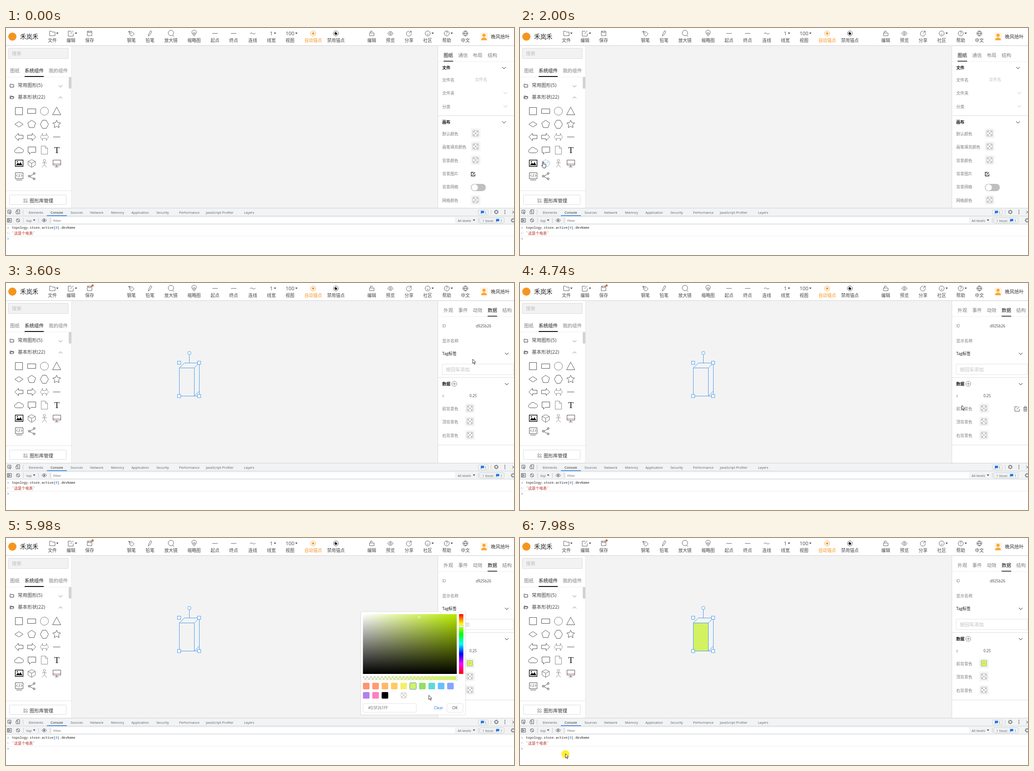
These frames come from a looping animation (1118x501 px, 8000 ms). An HTML page:

```html
<!DOCTYPE html>
<html lang="zh-CN">
<head>
<meta charset="utf-8">
<style>
html,body{margin:0;width:100%;height:100%;overflow:hidden;background:#fff}
svg{display:block;width:100vw;height:100vh;font-family:"Open Sans","Noto Sans CJK SC","Noto Sans CJK",sans-serif}
text{white-space:pre}
.mono{font-family:"Noto Sans Mono","Noto Sans CJK SC",monospace}
</style>
</head>
<body>
<svg id="stage" viewBox="0 0 1118 501"></svg>
<script>
const DARK = '#444', GREY = '#7d7d7d', PALE = '#bfbfbf', LINE = '#e4e4e4', BLUE = '#1a73e8', NODE = '#4a9cf0', ORANGE = '#f5951f', LIME = '#d3f261';

// Drawing helpers, each returning SVG markup
const T = (x, y, s, size = 9, fill = DARK, attr = '') => `<text x="${x}" y="${y}" font-size="${size}" fill="${fill}" ${attr}>${s}</text>`;
const mid = (x, y, s, size, fill, attr = '') => T(x, y, s, size, fill, 'text-anchor="middle" ' + attr);
const P = (x, y, d, stroke = DARK, w = 1, fill = 'none') => `<path transform="translate(${x} ${y})" d="${d}" stroke="${stroke}" stroke-width="${w}" fill="${fill}"/>`;
const R = (x, y, w, h, fill = 'none', stroke = 'none', rx = 0) => `<rect x="${x}" y="${y}" width="${w}" height="${h}" fill="${fill}" stroke="${stroke}" rx="${rx}"/>`;
const C = (x, y, r, fill = 'none', stroke = DARK) => `<circle cx="${x}" cy="${y}" r="${r}" fill="${fill}" stroke="${stroke}"/>`;
const G = (id, body) => `<g id="${id}">${body}</g>`;
const poly = (n, r, r2 = r) => 'M' + Array.from({length: n}, (_, i) => {
  const a = i / n * 2 * Math.PI - Math.PI / 2, q = i % 2 ? r2 : r;
  return (q * Math.cos(a)).toFixed(1) + ' ' + (q * Math.sin(a)).toFixed(1);
}).join('L') + 'z';
const chevron = (x, y, color = '#222', up = 1) => P(x, y, `M-4 ${-2 * up}l4 ${4 * up} 4 ${-4 * up}`, color);
const caret = (x, y) => P(x, y, 'M-2.5-1.3h5l-2.5 3z', 'none', 0, '#333');
const EDIT = 'M1-5h-6v10h10v-5M-1 1l6-6';

function header() {
  const circle = 'M-5.5 0a5.5 5.5 0 1 0 11 0a5.5 5.5 0 1 0-11 0', dash = 'M-6 0h12';
  const dot = 'M-2 0a2 2 0 1 0 4 0a2 2 0 1 0-4 0';
  const tools = [
    [102, '文件', 'M-6-5h4l2 2h6v8h-12z', 1], [143, '编辑', 'M1-5h-7v11h11v-6M-1 1l6-7', 1],
    [184, '保存', 'M-5-5h9l1 1v9h-10zM-3-5v3h6v-3'], [276, '钢笔', 'M-6-5l8 2 4 4-5 5-4-3zM-6-5l6 6'],
    [317, '铅笔', 'M-4 6l1-4 4-8 3 2-4 7z'], [363, '放大镜', 'M-6-1a6 6 0 1 0 12 0a6 6 0 1 0-12 0M4 4l3 3'],
    [414, '缩略图', 'M0 6c-8-9-5-13 0-13s8 4 0 13z' + dot], [460, '起点', dash], [501, '终点', dash],
    [543, '连线', 'M-6 1c4-7 7 5 12-2'], [584, '线宽', '', 1], [625, '视图', '', 1],
    [676, '自动锚点', circle], [726, '禁用锚点', circle],
    [805, '编辑', 'M-5-1h10v6h-10zM-3-1v-4h4v2'], [846, '预览', 'M-6 0q6-9 12 0q-6 9-12 0z' + dot],
    [887, '分享', 'M5 0a5.5 5.5 0 1 1-5-5M0 0l5-5h-4m4 0v4'], [928, '社区', circle + 'M-2 1q2 3 4 0', 1],
    [970, '帮助', circle, 1], [1011, '中文', circle + 'M-5.5 0h11M0-5.5q-5 5.5 0 11q5-5.5 0-11']
  ];
  return R(0, 38, 1118, 1, '#dedede') + R(0, 39, 1118, 1, '#ebebeb') + R(0, 0, 1118, 38, '#fff') + C(14, 19, 9, ORANGE, 'none') + T(31, 24, '禾岚禾', 13.4, '#222') +
    tools.map(([x, name, d, menu]) => {
      const color = name == '自动锚点' ? ORANGE : DARK;
      return P(x, 12, d, color, .85) + mid(x, 31, name, 9.7, color) + (menu ? caret(x + (name == '视图' ? 14 : name == '线宽' ? 8 : 11), 11.5) : '');
    }).join('') +
    mid(584, 16, 1, 11) + mid(625, 16, 100, 11) + mid(970, 15, '?', 8.5) + C(676, 12, 2.5, ORANGE, 'none') + P(726, 12, 'M0-3a3 3 0 1 0 3 3z', 'none', 0, '#111') +
    R(1044, 10, 17, 18, '#fff4e2') + C(1052, 16, 3.6, '#f9a83a', 'none') + P(1052, 27, 'M-6 0v-3q6-6 12 0v3z', 'none', 0, '#f9a83a') +
    T(1067, 23, '晚风拾叶', 10.4, '#333');
}

const CUBE = 'M0-8l8 4v8l-8 5-8-5v-8zM-8-4l8 4 8-4M0 0v9';
function library() {
  const shapes = [
    'M-8-8h16v16h-16z', 'M-9-5h18v10h-18z', 'M-9 0a9 9 0 1 0 18 0a9 9 0 1 0-18 0', 'M0-9l9 17h-18z',
    'M-9 0l9-6 9 6-9 6z', poly(5, 9), 'M-4-9h8l5 9-5 9h-8l-5-9z', poly(10, 9, 4.5),
    'M-9 0l8-8v4h10v8h-10v4z', 'M9 0l-8-8v4h-10v8h10v4z', 'M-9 0l5-8v5h8v-5l5 8-5 8v-5h-8v5z', 'M-8 0h16',
    'M-5 6a4 4 0 0 1-1-8a6 6 0 0 1 11-1a4.5 4.5 0 0 1 1 9z', 'M-8-7h17v12h-10l-4 4v-4h-3z', 'M-7-9h9l5 5v13h-14zM2-9v5h5', '',
    'M-8-7h17v14h-17z', CUBE, 'M0-3v6l-5 6M0 3l5 6M-5-1h10M-2.5-6a2.5 2.5 0 1 0 5 0a2.5 2.5 0 1 0-5 0', 'M-8-7h17v11h-17zM-8 1h17M0 4v4M-4 8h8',
    'M-8-8h17v13h-17zM-3-4l-3 2 3 3M4-4l3 2-3 3M1-5l-1 7M-6 8h13', 'M-5 0l11-6M-5 0l11 6'
  ];
  const soft = {2: '#666', 10: GREY, 14: GREY, 17: '#555', 18: GREY};
  const at = i => [Math.round(28 + i % 4 * 27.8) + .5, Math.round(183 + Math.floor(i / 4) * 28.7) + .5];
  return R(0, 40, 144, 357, '#fff') + R(143.5, 40, 1, 357, '#e8e8e8') +
    R(5, 44.5, 132, 23, '#f2f2f2', '#dcdcdc', 1) + T(13, 60, '搜索', 10.5, PALE) +
    T(9, 97.5, '图纸', 10.5, GREY) + T(41, 97.5, '系统组件', 10.5, '#111', 'font-weight="500"') + T(94, 97.5, '我的组件', 10.5, GREY) +
    R(0, 107.5, 144, 1, '#eee') + R(41, 106, 42, 2, '#111') + R(138, 108, 6, 26, '#d3d3d3', 'none', 3) +
    P(13, 127, 'M-4-3h3l1 1h4v5.5h-8z', '#333') + T(26, 129.5, '常用图形(5)', 10.5) + chevron(120, 128.5, GREY) +
    P(13, 153, 'M-4 3v-6h3l1 1h3v2M-4 3l1.5-4h7l-1.5 4z', '#333') + T(26, 155.5, '基本形状(22)', 10.5) + chevron(120, 153.5, GREY, -1) +
    shapes.map((d, i) => P(...at(i), d, soft[i] || '#333', .85)).join('') +
    mid(112, 276, 'T', 19, '#111', 'font-family="Liberation Serif,serif"') +
    P(28, 298, 'M-6 5l4-6 3 3 3-4 4 7z', 'none', 0, '#111') + P(...at(16), shapes[16], '#111', 1.4) + C(25, 295, 1.3, '#111', 'none') +
    [[51, 327], [62, 321], [62, 333]].map(p => C(...p, 2, '#fff', '#333')).join('') + R(104, 299, 16, 1, '#c77') +
    G('cubeHover', P(...at(17), CUBE, '#fff', 2) + P(...at(17), CUBE, '#9db6f2', .9)) +
    R(0, 358.5, 144, 1, LINE) + R(7.5, 368.5, 125, 21, '#fff', '#dcdcdc', 1) +
    P(43, 381, 'M-4-4h3v3h-3zM-4 1h3v3h-3zM1 1h3v3h-3zM2.5-4.5l2 2-2 2-2-2z', GREY, .8) + T(52, 384.8, '图形库管理', 10.4, '#333');
}

function swatch(x, y, color) {
  const cells = [[-5, -5], [2, -5], [-1.5, -1.5], [-5, 2], [2, 2]];
  return R(x - 9.5, y - 9.5, 19, 19, '#fff', '#e6e6e6', 1) + R(x - 6.5, y - 6.5, 13, 13, color || '#fff', '#aaa', 1) +
    (color ? P(x, y, 'M-2-1l2 2 2-2', '#9aa860', .8) : cells.map(([a, b]) => R(x + a, y + b, 3, 3, '#b5b5b5')).join(''));
}
const tabs = (names, active) => names.map((s, i) => T(963 + i * 32.3, 63.8, s, 10.5, i == active ? '#111' : GREY, i == active ? 'font-weight="500"' : '')).join('') +
  R(951, 73.5, 167, 1, '#eee') + R(963 + active * 32.3, 72.5, 21, 1.5, '#111');
const title = (y, s) => T(960, y, s, 9, '#111', 'font-weight="700"');

function sheetPanel() {
  const rows = ['默认颜色', '画笔填充颜色', '背景颜色', '背景图片', '背景网格', '网格颜色'];
  return tabs(['图纸', '通信', '布局', '结构'], 0) + title(91, '文件') + chevron(1096, 88) +
    T(960, 117.5, '文件名', 9, GREY) + T(1032, 117, '文件名', 9, PALE) +
    T(960, 147, '文件夹', 9, GREY) + chevron(1099, 143.5, PALE) + T(960, 176.5, '分类', 9, GREY) + chevron(1099, 173, PALE) +
    R(951, 193, 167, 1, '#dcdcdc') + title(211, '画布') + chevron(1096, 208) +
    rows.map((s, i) => T(960, 236.7 + i * 29.4, s, 8.9, GREY) + (i < 3 || i > 4 ? swatch(1033.5, Math.round(232 + i * 29.4) + .5) : '')).join('') +
    P(1028, 322.5, 'M1-4h-5v8h8v-4M-1 1l5-5', '#222', 1.3) + R(1023, 344, 33, 16, PALE, 'none', 8) + C(1031.5, 352, 7, '#fff', 'none');
}

function dataPanel() {
  return tabs(['外观', '事件', '动效', '数据', '结构'], 3) +
    T(960, 98, 'ID', 8.5, GREY) + T(1034, 97.5, 'd925b26', 8.3) + T(960, 130.5, '显示名称', 9, GREY) +
    T(960, 159, 'Tag标签', 8.8, '#111', 'font-weight="500"') + chevron(1102, 156) +
    R(960, 179, 157.5, 23, '#fff', '#e2e2e2', 1) + T(968, 194.5, '按回车添加', 10.5, PALE) +
    R(951, 208, 167, 1, '#dedede') + title(226, '数据') + C(986.5, 222.5, 5.5, 'none', GREY) + P(986.5, 222.5, 'M-3 0h6M0-3v6', GREY) + chevron(1102, 223) +
    T(960, 252, 'z', 8.5, GREY) + T(1020, 252, '0.25', 8.2) +
    ['前背景色', '顶背景色', '右背景色'].map((s, i) => T(960, 281 + i * 29.4, s, 8.9, GREY) + swatch(1021, Math.round(276 + i * 29.4) + .5)).join('') +
    G('picked', swatch(1021, 276.5, LIME)) + R(951, 357, 167, 1, '#dedede') +
    G('rowTools', P(1094, 278, EDIT, '#555') + P(1112, 278, 'M-4-3h8M-2-3v-2h4v2M-3-3v8h6v-8M-1-1v4M1-1v4', '#555'));
}

function node() {
  return G('front', R(381, 187, 33, 62, LIME)) +
    P(.5, .5, 'M381 187h33v62h-33zl11-11h33v62l-11 11M414 187l11-11M425 238v11h-11M403 157v19', NODE) +
    C(403.5, 154.5, 3.6, '#fff', NODE) +
    [[381, 176], [425, 176], [381, 249.5], [425, 249.5]].map(([x, y]) => R(x - 3.5, y - 3.5, 7, 7, '#fff', NODE)).join('');
}

// Colour picker for one HSV colour; the text is empty until a colour is chosen
function picker(id, hue, sat, val, color, text) {
  const rows = ['#ff9471', '#ff9c6e', '#ffb86b', '#ffcb62', '#f5f066', LIME, '#95de64', '#5cdbd3', '#69c0ff', '#85a5ff', '#b37feb', '#ff7fbf', '#000'];
  const grad = (name, attr, stops) => `<linearGradient id="${name + id}" ${attr}>${stops.map(([o, c, a = 1]) => `<stop offset="${o}" stop-color="${c}" stop-opacity="${a}"/>`).join('')}</linearGradient>`;
  const down = 'x2="0" y2="1"', hues = Array.from({length: 7}, (_, i) => [i / 6, `hsl(${i * 60},100%,50%)`]);
  return G(id, grad('sat', '', [[0, '#fff'], [1, `hsl(${hue},100%,46%)`]]) + grad('dark', down, [[0, '#000', 0], [1, '#000']]) +
    grad('hue', down, hues) + grad('alpha', '', [[0, color, 0], [1, color]]) +
    R(785.5, 168, 206.5, 132, `url(#sat${id})`) + R(785.5, 168, 206.5, 132, `url(#dark${id})`) +
    C(785.5 + 206.5 * sat, 168 + 132 * (1 - val), 2, 'none', '#fff') +
    R(997, 168, 9.5, 132, `url(#hue${id})`) + R(996, 167 + 132 * hue / 360, 11.5, 3, '#fff', '#ccc', 1) +
    R(785.5, 305, 206.5, 8.5, 'url(#checker)') + R(785.5, 305, 206.5, 8.5, `url(#alpha${id})`) + R(990, 304, 3, 10.5, '#fff', '#ccc', 1) +
    rows.map((c, i) => R(785.5 + i % 10 * 20.6, i < 10 ? 319.5 : 340, 14.5, 14.5, c, text && c == LIME ? '#4a90e2' : 'none', 2)).join('') +
    R(868, 340, 14.5, 14.5, 'url(#checker)', 'none', 2) +
    R(785.5, 365.5, 117.5, 19, '#fff', LINE, 2) + T(797, 378, text, 8.3, '#666') + mid(952, 378, 'Clear', 8.3, BLUE) +
    R(970.5, 365.5, 35.5, 19, '#fff', LINE, 2) + mid(988, 378, 'OK', 8.5, DARK));
}

function devtools() {
  const names = {50: 'Elements', 98: 'Console', 142: 'Sources', 185: 'Network', 231: 'Memory', 276: 'Application', 331: 'Security', 381: 'Performance', 440: 'JavaScript Profiler', 524: 'Layers'};
  const ui = (x, y, s, color = '#5f6368') => T(x, y, s, 7.4, color);
  const bar = (x, y) => R(x, y, 1, 11, '#ccc');
  const gear = (x, y) => C(x, y, 3, 'none', '#555') + P(x, y, 'M0-5v2M0 3v2M-5 0h2M3 0h2M-3.5-3.5l1 1M3.5 3.5l-1-1M-3.5 3.5l1-1M3.5-3.5l-1 1', '#555', 1.3);
  const chat = (x, y) => P(x, y, 'M-3-3h7v5h-5l-2 2z', 'none', 0, BLUE);
  return R(0, 397, 1118, 104, '#fff') + R(0, 397, 1118, 36, '#f1f3f4') + R(0, 397, 1118, 1, '#cfd2d5') + R(0, 414.5, 1118, 1, '#d0d3d6') + R(0, 432.5, 1118, 1, '#d0d3d6') +
    Object.entries(names).map(([x, s]) => ui(x, 409.5, s, s == 'Console' ? '#222' : undefined)).join('') + R(90, 413.5, 44, 1.5, BLUE) +
    P(8, 406, 'M3-1v-3h-7v7h3M-1-1l5 2-2 1-1 3z', '#555') + P(26, 406, 'M-4 3v-5h4v6h-4M-2-2v-3h6v9h-3', '#555') + bar(37, 401) +
    R(1039.5, 401.5, 22, 10.5, '#f1f3f4', '#cfd2d6', 2) + chat(1048, 406.5) + ui(1053, 409.5, 1) + bar(1067, 401) + gear(1079, 406) +
    [-3.5, 0, 3.5].map(d => C(1098, 406 + d, 1, '#555', 'none')).join('') + P(1117, 406.5, 'M-3-3l6 6M-3 3l6-6', '#555') +
    P(7, 424.5, 'M-4-4h9v8h-9zM-2-4v8M0-2l3 2-3 2z', '#555') + C(26.5, 424.5, 3.7, 'none', '#555') + P(26.5, 424.5, 'M-2.5-2.5l5 5', '#555') + bar(38, 419) +
    ui(45, 427.5, 'top') + caret(62, 424) + bar(71, 419) + P(84, 424.5, 'M-5 0q5-7 10 0q-5 7-10 0z', '#555') + C(84, 424.5, 1.7, '#555', 'none') + bar(97, 419) +
    R(101, 418, 887, 13, '#fff') + ui(104, 427.8, 'Filter', '#666') + ui(994, 427.5, 'All levels') + caret(1030, 424) + bar(1039, 419) +
    R(1042.5, 418.5, 54, 12, '#f1f3f4', '#cfd2d6', 2) + ui(1048, 427.5, '1 Issue:') + chat(1081.5, 424.5) + ui(1088, 427.5, 1) + gear(1116, 424.5) +
    P(5, 441, 'M-1.5-2l2 2-2 2', GREY) + P(5, 452.5, 'M0-2l-2 2 2 2M2 0h1', '#999', .8) + P(5, 465, 'M-1.5-2l2 2-2 2', BLUE) +
    T(13, 443, 'topology.store.active[<tspan fill="#2f7fd6">0</tspan>].devName', 7.28, '#222', 'class="mono"') +
    T(13, 455.5, "'这是个电表'", 8.2, '#b3261e', 'class="mono"') + R(0, 459, 1118, 1, '#eee');
}

const stage = document.getElementById('stage');
stage.innerHTML = `<defs><pattern id="checker" width="8" height="8" patternUnits="userSpaceOnUse" x="785" y="305">${R(0, 0, 8, 8, '#fff') + R(0, 0, 4, 4, '#d4d4d4') + R(4, 4, 4, 4, '#d4d4d4')}</pattern></defs>` +
  R(144, 38, 806, 359, '#f3f3f3') + R(950, 38, 168, 359, '#fff') + R(950, 38, 1, 359, '#ddd') +
  library() + G('node', node()) + G('sheet', sheetPanel()) + G('data', dataPanel()) + header() + G('badge', C(190.5, 5.5, 2.5, '#c8744c', 'none')) +
  devtools() +
  G('popup', R(779, 162, 234, 230, 'rgba(0,0,0,.035)', 'none', 4) + R(781, 163, 230, 227, '#fff', 'rgba(0,0,0,.05)', 2) +
    picker('before', 96, .55, .87, '#95de64', '') + picker('after', 73, .6, .95, LIME, '#D3F261FF') +
    G('okFocus', R(970.5, 365.5, 35.5, 19, '#fff', NODE, 2) + mid(988, 378, 'OK', 8.5, BLUE))) +
  G('cursor', G('halo', C(0, 1, 9, 'rgba(255,238,30,.9)', 'none')) +
    G('arrow', P(0, 0, 'M0 0v9.5l2.2-2 1.7 3.8 1.5-.7-1.7-3.6h3z', '#222', .9, '#fff')) +
    G('hand', P(0, 0, 'M-1 8v-7q1-2 2 0v4l5 1.5v4l-1.5 3.5h-4l-4-5q0-2 2.5 0z', '#222', 1, '#fff')));
const el = {};
stage.querySelectorAll('g[id]').forEach(g => el[g.id] = g);

// Pointer path: time, x, y
const path = [
  [70, 962, 477], [300, 720, 405], [600, 330, 305], [830, 179, 269], [1100, 125, 264], [1660, 51, 297], [1730, 48, 297], [1860, 51, 295],
  [2000, 51, 295], [2100, 58, 293], [2480, 403, 213], [2580, 420, 222], [2760, 592, 252], [3150, 960, 110], [3350, 1098, 66], [3600, 1027, 168],
  [3670, 1028, 170], [3950, 1040, 230], [4420, 996, 280], [4550, 988, 279], [4740, 972, 270], [4860, 1021, 276], [4930, 1018, 276], [5090, 887, 264],
  [5300, 880, 300], [5500, 897, 326], [5700, 898, 328], [5840, 905, 335], [6300, 988, 374], [6560, 988, 374], [6660, 918, 369],
  [6950, 914, 371], [7200, 640, 430], [7500, 260, 483], [7710, 122, 479], [7840, 100, 476], [8000, 100, 476]
];
const between = (t, a, b) => t >= a && t < b;
const ramp = (t, a, b) => Math.min(1, Math.max(0, (t - a) / (b - a)));
const show = (g, on) => g.setAttribute('visibility', on ? 'inherit' : 'hidden');

function draw(t) {
  const i = Math.max(1, path.findIndex(p => p[0] > t));
  const [a, b] = [path[i - 1], path[i]], k = ramp(t, a[0], b[0]);
  const x = a[1] + (b[1] - a[1]) * k, y = a[2] + (b[2] - a[2]) * k;
  const dropped = t >= 2480, chosen = t >= 5550, hand = between(t, 1640, 2080);
  const open = ramp(t, 4890, 5030) * (1 - ramp(t, 6605, 6752));

  el.cursor.setAttribute('transform', `translate(${x} ${y})`);
  el.popup.setAttribute('transform', `translate(0 ${163 * (1 - open)}) scale(1 ${open})`);
  el.popup.setAttribute('opacity', Math.min(1, open * 1.1));
  show(el.cursor, t >= 70);
  show(el.hand, hand);
  show(el.arrow, !hand);
  show(el.halo, [[2100, 2480], [4860, 4930], [5530, 5600], [6470, 6550], [7950, 8000]].some(s => between(t, ...s)));
  show(el.cubeHover, between(t, 1640, 2150));
  for (const id of ['node', 'data', 'badge']) show(el[id], dropped);
  show(el.sheet, !dropped);
  show(el.popup, open > 0);
  show(el.before, !chosen);
  show(el.after, chosen);
  show(el.picked, chosen);
  show(el.okFocus, t >= 6280);
  show(el.front, t >= 6530);
  show(el.rowTools, dropped && x > 951 && y > 263 && y < 292);
}
const start = performance.now();
(function loop() {
  draw((performance.now() - start) % 8000);
  requestAnimationFrame(loop);
})();
</script>
</body>
</html>
```
